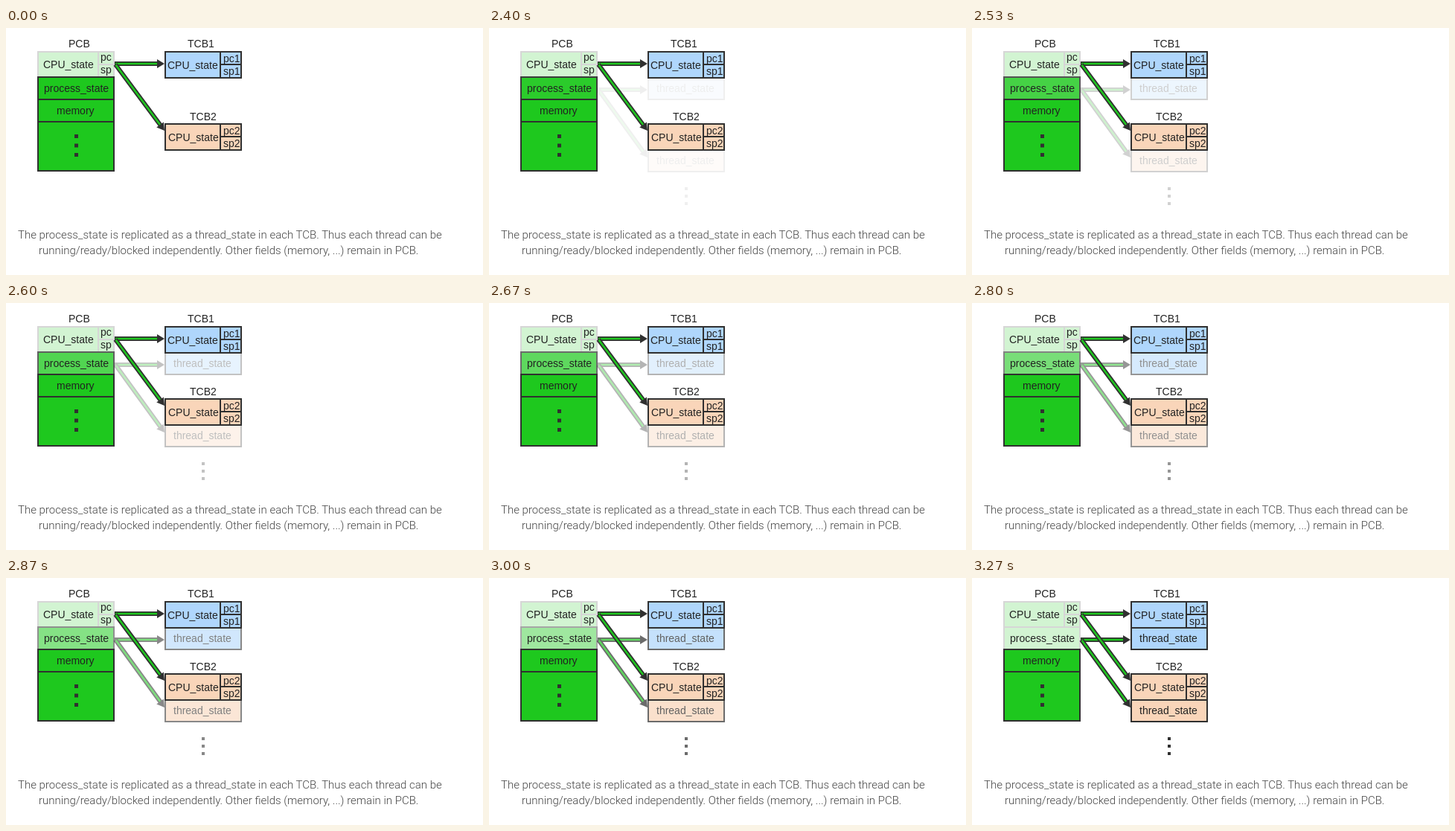
Animation, 641 px wide and 332 px high, one loop 4.74 s. Source, as an HTML page:

```html
<!DOCTYPE html>
<html lang="en">
<head>
<meta charset="utf-8">
<title>Process and thread control blocks</title>
<style>
  html, body { margin: 0; width: 100%; height: 100%; overflow: hidden; background: #fff; }
  svg { display: block; }
  text { font: 14px "Liberation Sans", Arial, sans-serif; fill: #222; }
  .caption { font: 300 15px Roboto, sans-serif; fill: #444; }
</style>
</head>
<body>
<svg id="stage" width="641" height="332" viewBox="0 0 641 332"></svg>
<script>
const LOOP = 4740, FADE_START = 2400, FADE_STEPS = 14, STEP = 200 / 3;
const INK = '#303030', GREEN = '#1ec81e', BLUE = '#afd6fc', PEACH = '#f9d5b9';

const box = (x, y, w, h, fill) =>
  `<rect x="${x}" y="${y}" width="${w}" height="${h}" fill="${fill}" stroke="${INK}" stroke-width="2"/>`;
const line = (x1, y1, x2, y2) =>
  `<path d="M${x1} ${y1}L${x2} ${y2}" stroke="${INK}" stroke-width="2"/>`;
const label = (x, y, str, cls = '') => `<text x="${x}" y="${y}" class="${cls}">${str}</text>`;
const veil = (y, h, id) =>
  `<rect id="${id}" x="42" y="${y}" width="104" height="${h}" fill="#fff" opacity=".8"/>`;
const dots = (x, y, size, gap) => [0, 1, 2].map(i =>
  `<rect x="${x}" y="${y + i * gap}" width="${size}" height="${size}" fill="${INK}"/>`).join('');

function arrow(x1, y1, x2, y2) {
  const length = Math.hypot(x2 - x1, y2 - y1);
  const angle = Math.atan2(y2 - y1, x2 - x1) * 180 / Math.PI;
  return `<g transform="translate(${x1} ${y1}) rotate(${angle})">
    <path d="M0 0H${length - 9}" stroke="${INK}" stroke-width="6"/>
    <path d="M1 0H${length - 9}" stroke="${GREEN}" stroke-width="2.4"/>
    <path d="M${length} 0l-10 -6v12z" fill="${INK}"/></g>`;
}

function threadBlock(n, y, color, x) {
  return box(214, y, 102, 35, color) + line(288, y, 288, y + 35) + line(288, y + 17, 316, y + 17) +
    label(x, y + 23, 'CPU_state') + label(292, y + 14, 'pc' + n) + label(292, y + 31, 'sp' + n);
}

const processBlock =
  box(43, 32, 102, 160, GREEN) + line(43, 66, 145, 66) + line(43, 96, 145, 96) +
  line(43, 126, 145, 126) + line(124, 32, 124, 66) + line(124, 49, 145, 49) +
  veil(31, 34, 'cpuVeil') + veil(65, 30, 'stateVeil') +
  label(50, 54, 'CPU_state') + label(127, 44, 'pc') + label(127, 61, 'sp') +
  label(51, 86, 'process_state') + label(68, 116, 'memory') + dots(92, 143, 5, 12.5);

const threadStates =
  box(214, 67, 102, 29, BLUE) + box(214, 164, 102, 29, PEACH) +
  label(225, 86, 'thread_state') + label(225, 183, 'thread_state') +
  arrow(146, 83, 213, 83) + arrow(147, 83, 213, 174) + dots(263, 214, 4, 10);

document.getElementById('stage').innerHTML =
  label(84, 26, 'PCB') + label(244, 26, 'TCB1') + label(247, 124, 'TCB2') +
  processBlock + `<g id="threadStates">${threadStates}</g>` +
  threadBlock(1, 32, BLUE, 217) + threadBlock(2, 129, PEACH, 218) +
  arrow(146, 48, 213, 48) + arrow(147, 49, 213, 138) +
  label(16, 283, 'The process_state is replicated as a thread_state in each TCB. Thus each thread can be', 'caption') +
  label(44, 304, 'running/ready/blocked independently. Other fields (memory, ...) remain in PCB.', 'caption');

const added = document.getElementById('threadStates');
const stateVeil = document.getElementById('stateVeil');

// The fade advances at 15 steps per second, on times rounded to 10 ms.
function fadeAt(time) {
  let step = 0;
  while (step < FADE_STEPS && time >= FADE_START + Math.round(step * STEP / 10) * 10) step++;
  return step / FADE_STEPS;
}

function draw(now) {
  const fade = fadeAt(now % LOOP);
  added.setAttribute('opacity', fade);
  stateVeil.setAttribute('opacity', 0.8 * fade);
  requestAnimationFrame(draw);
}
draw(performance.now());
</script>
</body>
</html>
```
